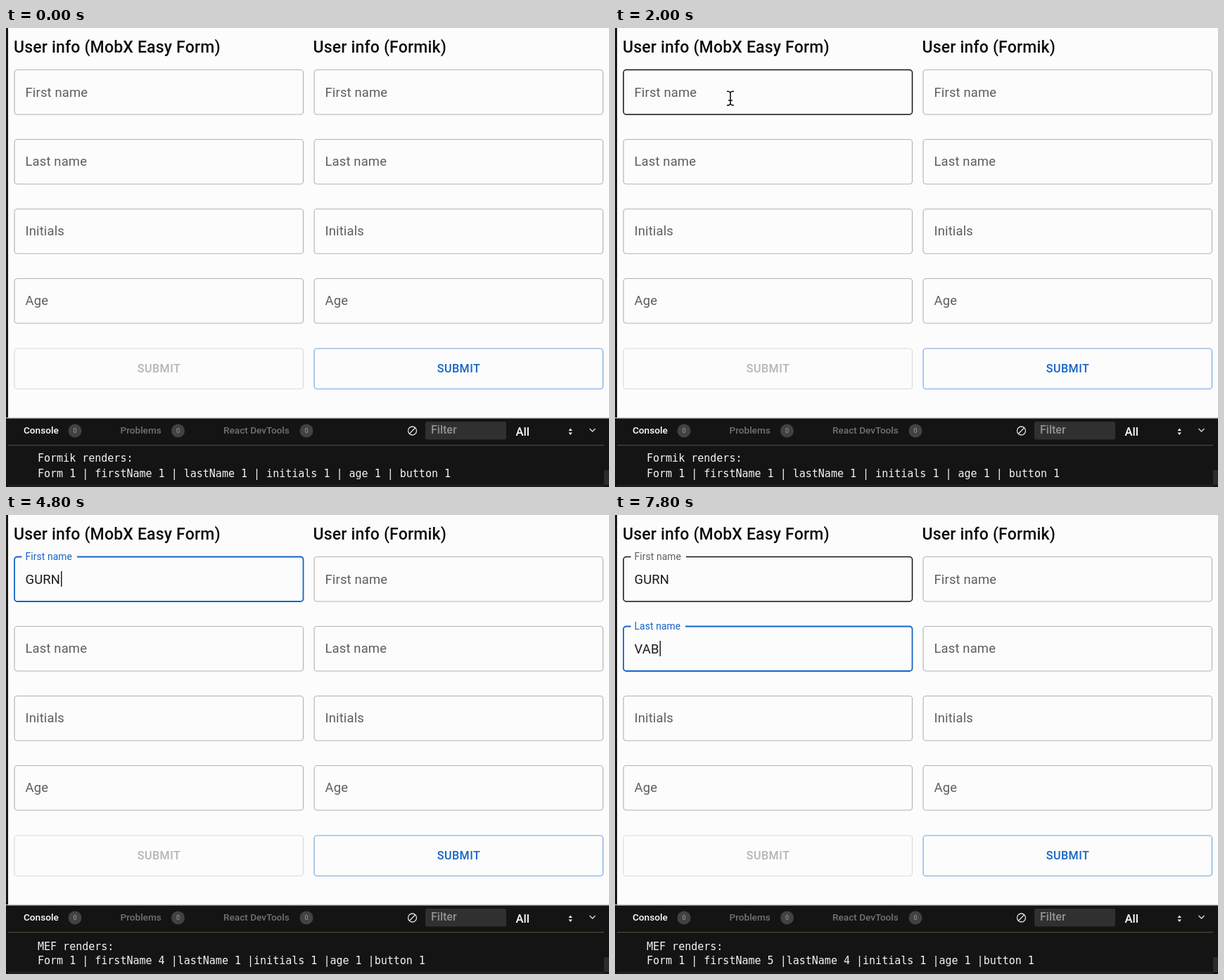
Recreate the animation shown at these times as an HTML page. Size 857 by 653 pixels, loop 8 s.

```html
<!DOCTYPE html>
<html lang="en">
<head>
<meta charset="utf-8">
<title>Form render comparison</title>
<style>
  html, body { margin: 0; width: 100%; height: 100%; overflow: hidden; background: #fcfcfc; }
  svg { display: block; width: 857px; height: 653px; font-family: Roboto, sans-serif; }
  text { white-space: pre; }
  .title { font-size: 23px; font-weight: 500; letter-spacing: .0075em; fill: #0c0c0c; }
  .box { fill: none; stroke: #b3b3b0; stroke-width: 1.15; }
  .box.hover { stroke: #111; stroke-width: 1.5; }
  .box.focus { stroke: #1464c4; stroke-width: 1.8; }
  .label, .value { font-size: 18.4px; letter-spacing: .00938em; }
  .label { fill: #5e5e5e; }
  .label.small { font-size: 13.8px; }
  .label.focus { fill: #1464c4; }
  .value { fill: #1a1a1a; }
  .submit { font-size: 16.1px; font-weight: 500; letter-spacing: .02857em; text-anchor: middle; }
  .tab { font-size: 13.6px; font-weight: 500; fill: #737373; }
  .badge { font-size: 9px; fill: #a0a0a0; text-anchor: middle; }
  .log { font: 15px "DejaVu Sans Mono", monospace; fill: #f4f4f4; }
  .line { fill: none; stroke: #ddd; stroke-width: 1.3; }
</style>
</head>
<body>
<svg viewBox="0 0 857 653" id="stage">
  <rect width="857" height="653" fill="#fcfcfc"/>
  <rect width="3" height="653" fill="#181814"/>
  <text class="title" x="11" y="34.5">User info (MobX Easy Form)</text>
  <text class="title" x="436.5" y="34.5">User info (Formik)</text>
  <g id="forms"></g>

  <rect y="554" width="857" height="1.5" fill="#c9c9c9"/>
  <rect y="555.5" width="857" height="98" fill="#141414"/>
  <rect x="3" y="593" width="847" height="1.2" fill="#4c4c36"/>
  <rect x="3" y="650.5" width="847" height="1" fill="#35352a"/>
  <rect x="850" y="629" width="7" height="21" fill="#2b2b2b"/>
  <g id="tabs"></g>
  <g class="line">
    <circle cx="577.5" cy="573" r="6"/>
    <path d="M573.3 577.2 l8.4 -8.4 M829.5 570 l4 4 l4 -4"/>
  </g>
  <rect x="596" y="560" width="115" height="25.5" rx="3" fill="#303030"/>
  <text x="604" y="577" font-size="16" font-weight="500" fill="#929292">Filter</text>
  <text x="724.5" y="580" font-size="16.5" font-weight="500" fill="#fff">All</text>
  <path d="M799.5 573 l2.7 -3.5 l2.7 3.5z M799.5 575.5 l2.7 3.5 l2.7 -3.5z" fill="#eee"/>
  <text class="log" id="log1" x="45"></text>
  <text class="log" id="log2" x="45" y="639"></text>

  <path id="arrow" d="M0 0 V18.6 L4.2 14.7 L7.4 22.2 L10.9 20.7 L7.8 13.4 H13.4 Z"
        stroke="#fff" stroke-width="1.2" style="filter:drop-shadow(0 1.5px 1.5px #0006)"/>
  <g id="beam" fill="none">
    <path d="M-5 -10 Q0 -10 0 -7 Q0 -10 5 -10 M-5 10 Q0 10 0 7 Q0 10 5 10 M0 -8 V8 M-3 3 H3" stroke="#fff" stroke-width="3.4"/>
    <path d="M-5 -10 Q0 -10 0 -7 Q0 -10 5 -10 M-5 10 Q0 10 0 7 Q0 10 5 10 M0 -8 V8 M-3 3 H3" stroke="#111" stroke-width="1.6"/>
  </g>
</svg>
<script>
const LOOP = 8000, STEP = 200, BLINK = 500;
const byId = id => document.getElementById(id);

function add(parent, tag, attrs, text = '') {
  const node = document.createElementNS('http://www.w3.org/2000/svg', tag);
  for (const key in attrs) node.setAttribute(key, attrs[key]);
  node.textContent = text;
  return parent.appendChild(node);
}
const set = (node, attrs) => { for (const key in attrs) node.setAttribute(key, attrs[key]); };
const show = (node, on) => node.setAttribute('visibility', on ? 'visible' : 'hidden');
const countUntil = (times, t) => times.filter(time => time <= t).length;

function makeField(name, i, x) {
  const y = 59.5 + 99 * i, labelY = i ? 96.5 + 99 * i : 97.5;
  const forms = byId('forms');
  const box = add(forms, 'rect', { class: 'box', x: x + .5, y, width: 410.5, height: 63.5, rx: 4 });
  const notch = add(forms, 'rect', { x: x + 11, y: y - 2, width: i ? 77.5 : 78.5, height: 4, fill: '#fcfcfc', visibility: 'hidden' });
  const label = add(forms, 'text', { class: 'label', x: x + 16, y: labelY }, name);
  const value = add(forms, 'text', { class: 'value', x: x + 16, y: y + 38 });
  const caret = add(forms, 'rect', { x: x + 17, y: y + 20.5, width: 1.4, height: 22, fill: '#111', visibility: 'hidden' });
  return { x, y, labelY, box, notch, label, value, caret };
}

const columns = [11.5, 437.5].map((x, side) => {
  const fields = ['First name', 'Last name', 'Initials', 'Age'].map((name, i) => makeField(name, i, x));
  const forms = byId('forms');
  add(forms, 'rect', { x: x + .5, y: 456, width: 410.5, height: 57.5, rx: 4, fill: 'none',
    stroke: side ? '#72a6df' : '#dadad7', 'stroke-width': 1.15 });
  add(forms, 'text', { class: 'submit', x: x + 206, y: 489.5, fill: side ? '#1464c4' : '#b5b5b5' }, 'SUBMIT');
  return fields;
});

[['Console', 25, 98], ['Problems', 162.5, 244.5], ['React DevTools', 309, 427]].forEach(([name, x, badgeX], i) => {
  const tab = add(byId('tabs'), 'text', { class: 'tab', x, y: 577 }, name);
  if (!i) tab.style.fill = '#fff';
  add(byId('tabs'), 'circle', { cx: badgeX, cy: 573, r: 9.5, fill: '#424242' });
  add(byId('tabs'), 'text', { class: 'badge', x: badgeX, y: 576.2 }, '0');
});

// Focus spans, typed text and key times of the two fields in use.
const entries = [
  { field: columns[0][0], text: 'GURN', focus: 2800, blur: 5200, keys: [3800, 4200, 4400, 4800] },
  { field: columns[0][1], text: 'VAB', focus: 5200, blur: LOOP, keys: [6400, 6800, 7400] }
];

function drawEntry({ field, text, focus, blur, keys }, t, hovered) {
  const floated = t >= focus, active = floated && t < blur;
  const count = countUntil(keys, t);
  field.box.setAttribute('class', 'box' + (active ? ' focus' : hovered ? ' hover' : ''));
  field.label.setAttribute('class', 'label' + (floated ? ' small' : '') + (active ? ' focus' : ''));
  field.label.setAttribute('y', floated ? field.labelY - 33.3 + (field.y > 100 ? .7 : 0) : field.labelY);
  show(field.notch, floated);
  field.value.textContent = text.slice(0, count);
  const since = t - (count ? keys[count - 1] : focus);
  const width = count ? field.value.getComputedTextLength() : 0;
  field.caret.setAttribute('x', field.x + 17 + width);
  show(field.caret, active && since % (2 * BLINK) < BLINK);
}

function drawPointer(t) {
  const path = [[400, 139, 22], [600, 149, 45], [800, 156, 64], [1000, 161, 86], [1200, 163, 98], [1400, 164, 100]];
  const [, x, y] = path.filter(p => p[0] <= t).pop() || path[0];
  const inside = t >= 1000;
  for (const id of ['arrow', 'beam']) set(byId(id), { transform: `translate(${x} ${y})` });
  show(byId('arrow'), t >= 400 && !inside);
  show(byId('beam'), inside && t < 3800);
  return inside;
}

function drawLog(t) {
  const [first, last] = entries.map(e => 1 + countUntil(e.keys, t - STEP));
  const typed = first > 1;
  byId('log1').textContent = typed ? 'MEF renders:' : 'Formik renders:';
  byId('log1').setAttribute('y', typed ? 619 : 617);
  byId('log2').textContent = typed
    ? `Form 1 | firstName ${first} |lastName ${last} |initials 1 |age 1 |button 1`
    : 'Form 1 | firstName 1 | lastName 1 | initials 1 | age 1 | button 1';
}

const start = performance.now();
function frame(now) {
  const t = Math.floor((Math.max(0, now - start) % LOOP) / STEP) * STEP;
  const hovered = drawPointer(t);
  entries.forEach((entry, i) => drawEntry(entry, t, hovered && !i));
  drawLog(t);
  requestAnimationFrame(frame);
}
frame(start);
</script>
</body>
</html>
```
